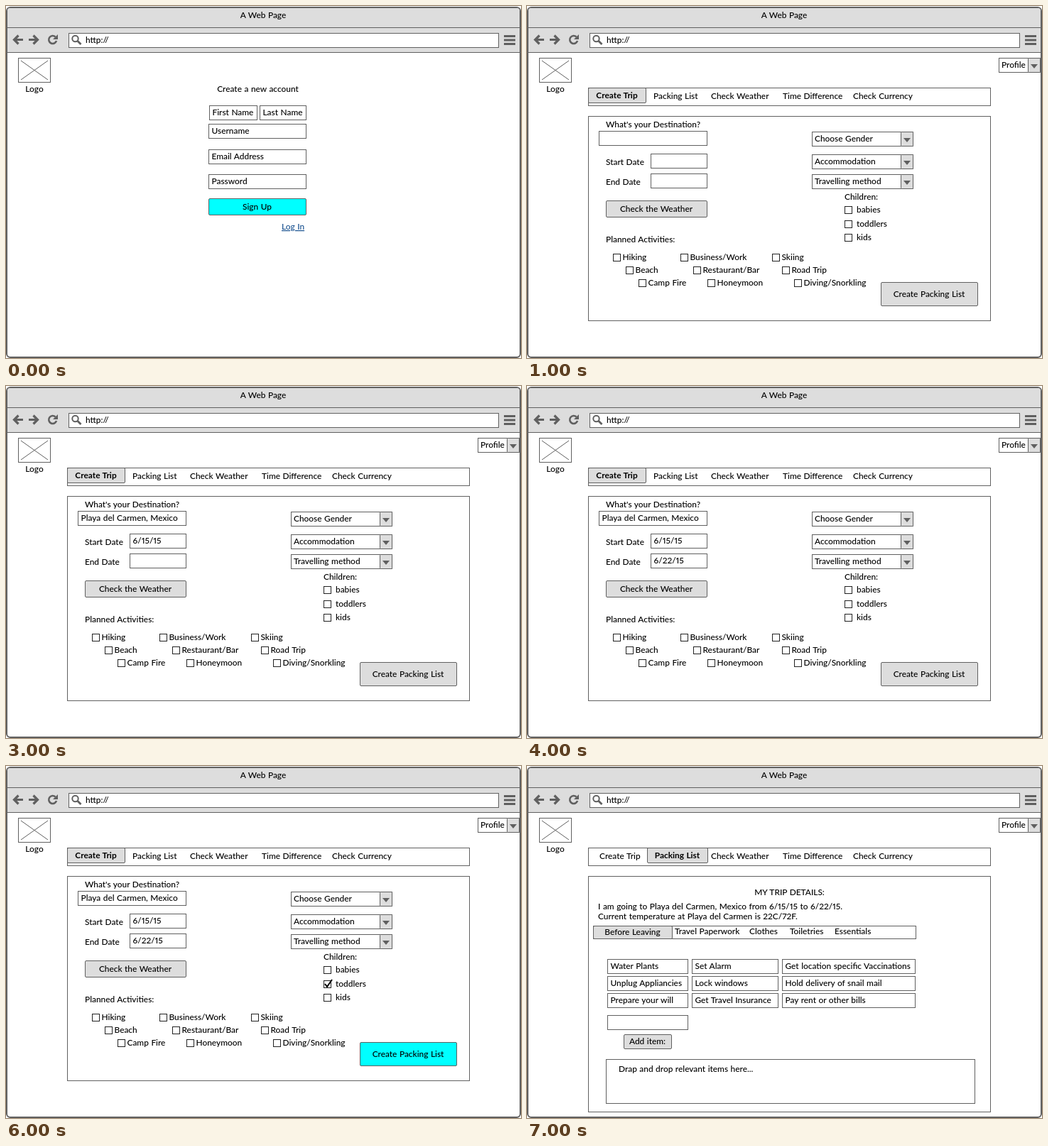
An HTML page for the animation above (8 s loop, 725 px wide and 496 px high).

```html
<!DOCTYPE html>
<html lang="en">
<head>
<meta charset="utf-8">
<title>Trip planner wireframe</title>
<style>
  html, body { margin: 0; width: 100%; height: 100%; overflow: hidden; background: #fff; }
  svg { display: block; }
  text { font: 500 11.9px Lato, sans-serif; font-variant-numeric: proportional-nums; word-spacing: .5px; fill: #000; }
  .bold { font-weight: 700; }
  .mid { text-anchor: middle; }
  .link { fill: #17508f; text-decoration: underline; }
</style>
</head>
<body>
<svg id="stage" width="725" height="496" viewBox="0 0 725 496"></svg>
<script>
const GREY = '#ddd', LINE = '#606060', CYAN = '#0ff';

const text = (x, y, s, cls = '') => `<text x="${x}" y="${y}" class="${cls}">${s}</text>`;
const path = (d, stroke = LINE, width = 1, fill = 'none') =>
  `<path d="${d}" stroke="${stroke}" stroke-width="${width}" fill="${fill}"/>`;
// Boxes are given by their left, top, right and bottom pixel.
const box = (l, t, r, b, fill = '#fff', radius = 0, stroke = LINE) =>
  `<rect x="${l + .5}" y="${t + .5}" width="${r - l}" height="${b - t}" rx="${radius}" fill="${fill}" stroke="${stroke}"/>`;
const field = (l, t, r, s = '') => box(l, t, r, t + 20) + text(l + 4.5, t + 14, s);
const button = (l, t, r, b, s, fill = GREY, cls = '') =>
  box(l, t, r, b, fill, 1.5) + text((l + r) / 2, (t + b) / 2 + 4, s, 'mid ' + cls);
const combo = (l, t, r, s) =>
  box(l, t, r, t + 20) + box(r - 17, t, r, t + 20, GREY, 1) + text(l + 4, t + 14, s) +
  path(`M${r - 13} ${t + 9}h10l-5 6z`, 'none', 0, LINE);
const check = (x, y, s, gap = 13.5, on = false) =>
  box(x, y, x + 10, y + 10, '#fff', 0, '#222') + text(x + gap, y + 9, s) +
  (on ? path(`M${x + 2} ${y + 5}l3 4l7-10`, '#000', 2) : '');

const chrome = `
  <rect x="1" y="2" width="723" height="493" rx="5" fill="#fff" stroke="${LINE}" stroke-width="2"/>
  ${path('M2 65V7q0-4 4-4H719q4 0 4 4V65z', 'none', 0, GREY)}
  ${path('M1 30.5H724M1 65.5H724')}
  ${text(362, 17, 'A Web Page', 'mid')}
  ${path('M24 47.5H12M17.5 41.5l-6 6l6 6M32 47.5H44M38.5 41.5l6 6l-6 6', LINE, 3.2)}
  ${path('M69.5 43.5A5.5 5.5 0 1 0 71 49', LINE, 2.6)}
  ${path('M73 40v7h-7z', 'none', 0, LINE)}
  ${box(88, 38, 693, 58)}
  <circle cx="97.5" cy="46" r="4.2" fill="none" stroke="${LINE}" stroke-width="2"/>
  ${path('M100.5 49l5 5', LINE, 2.8)}
  ${text(112, 52, 'http://')}
  ${path('M701 42.5h16M701 48h16M701 53.5h16', LINE, 3)}
  ${box(17, 73, 62, 107)}
  ${path('M21 77l38 27M59 77l-38 27')}
  ${text(40, 121, 'Logo', 'mid')}`;

const signUp = () =>
  text(354.5, 121, 'Create a new account', 'mid') +
  field(286, 140, 353, 'First Name') + field(357, 140, 422, 'Last Name') +
  field(285, 166, 422, 'Username') +
  field(285, 202, 422, 'Email Address') +
  field(285, 237, 422, 'Password') +
  button(285, 271, 422, 294, 'Sign Up', CYAN) +
  text(388, 315, 'Log In', 'link');

const tabs = [
  ['Create Trip', 102, 86, 167], ['Packing List', 178, 169, 254],
  ['Check Weather', 259], ['Time Difference', 360], ['Check Currency', 459]
];
const page = (active, bottom) =>
  combo(664, 73, 722, 'Profile') + box(86, 115, 652, 140) +
  tabs.map(([name, x, l, r], i) => i === active
    ? button(l, 115, r, 136, name, GREY, 'bold') : text(x, 131, name)).join('') +
  box(86, 155, 652, bottom);

const activities = [
  [121, 349, 'Hiking'], [216, 349, 'Business/Work'], [345, 349, 'Skiing'],
  [139, 367, 'Beach'], [234, 367, 'Restaurant/Bar'], [359, 367, 'Road Trip'],
  [157, 385, 'Camp Fire'], [254, 385, 'Honeymoon'], [376, 385, 'Diving/Snorkling']
];
const createTrip = step =>
  page(0, 443) +
  text(111, 171, "What's your Destination?") +
  field(101, 176, 253, step >= 2 ? 'Playa del Carmen, Mexico' : '') +
  text(111, 224, 'Start Date') + field(174, 208, 253, step >= 3 ? '6/15/15' : '') +
  text(111, 252, 'End Date') + field(174, 236, 253, step >= 4 ? '6/22/15' : '') +
  button(111, 274, 253, 297, 'Check the Weather') +
  combo(401, 177, 543, 'Choose Gender') +
  combo(401, 209, 543, 'Accommodation') +
  combo(401, 237, 543, 'Travelling method') +
  text(447, 273, 'Children:') +
  check(447, 282, 'babies', 17) +
  check(447, 302, 'toddlers', 17, step >= 5) +
  check(447, 321, 'kids', 17) +
  text(111, 333, 'Planned Activities:') +
  activities.map(a => check(...a)).join('') +
  button(498, 389, 634, 422, 'Create Packing List', step >= 6 ? CYAN : GREY);

const columns = [
  [113, 226, 'Water Plants', 'Unplug Appliancies', 'Prepare your will'],
  [232, 353, 'Set Alarm', 'Lock windows', 'Get Travel Insurance'],
  [359, 546, 'Get location specific Vaccinations', 'Hold delivery of snail mail', 'Pay rent or other bills']
];
const packingList = () =>
  page(1, 487) +
  text(369.5, 182, 'MY TRIP DETAILS:', 'mid') +
  text(100, 202, 'I am going to Playa del Carmen, Mexico from 6/15/15 to 6/22/15.') +
  text(100, 216, 'Current temperature at Playa del Carmen is 22C/72F.') +
  box(93, 225, 547, 243) + button(93, 225, 204, 243, 'Before Leaving') +
  text(208, 237, 'Travel Paperwork') + text(313, 237, 'Clothes') +
  text(370, 237, 'Toiletries') + text(433, 237, 'Essentials') +
  columns.map(([l, r, ...items]) =>
    items.map((s, i) => field(l, 272 + 24 * i, r, s)).join('')).join('') +
  field(113, 351, 226) +
  button(136, 378, 203, 398, 'Add item:') +
  box(111, 413, 630, 475) + text(129, 431, 'Drap and drop relevant items here...');

const stage = document.getElementById('stage');
let shown = -1;
function draw() {
  const step = Math.floor(performance.now() % 8000 / 1000);
  if (step !== shown) {
    shown = step;
    stage.innerHTML = chrome + (step === 0 ? signUp() : step < 7 ? createTrip(step) : packingList());
  }
  requestAnimationFrame(draw);
}
draw();
</script>
</body>
</html>
```
